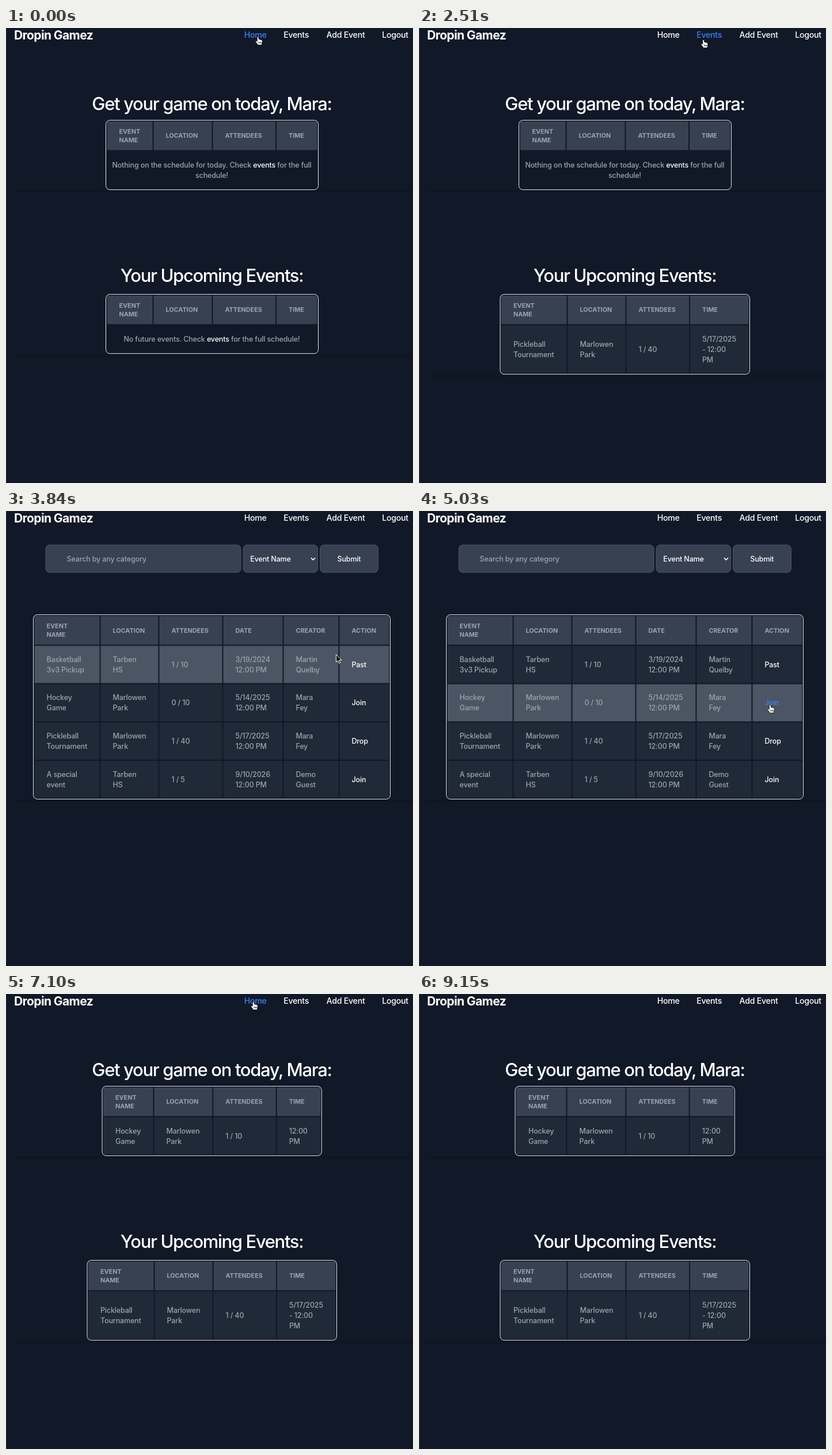
These frames come from a looping animation (707 by 792 pixels, 9770 ms). An HTML page:

```html
<!DOCTYPE html>
<html lang="en">
<head>
<meta charset="utf-8">
<title>Events app</title>
<style>
  html, body { margin: 0; width: 100%; height: 100%; overflow: hidden; background: #111827; }
  svg { display: block; width: 707px; height: 792px; }
  text {
    font: 450 12.5px Inter, Roboto, sans-serif; font-optical-sizing: none;
    letter-spacing: -.15px; fill: #9ca3af;
  }
  .brand { font-size: 21px; font-weight: 700; letter-spacing: -.6px; fill: #fff; }
  .nav { font-size: 14.2px; font-weight: 550; letter-spacing: -.28px; fill: #fff; }
  .title { font-size: 31px; font-weight: 500; letter-spacing: -1.35px; fill: #fff; }
  .head { font-size: 10.8px; font-weight: 700; letter-spacing: 0; }
  .strong { font-weight: 550; fill: #fff; }
  .mid { text-anchor: middle; }
  .field { fill: #374151; stroke: #4b5563; }
  .frame { fill: none; stroke: #e5e7eb; }
</style>
</head>
<body>
<svg id="stage" xmlns="http://www.w3.org/2000/svg"></svg>
<script>
const LOOP = 9770, STEP = 147.6;
const stage = document.getElementById('stage');

// Pointer tip: [step, x, y], linear between points
const PATH = [
  [0, 437.5, 15], [1, 437.5, 15], [2, 430, 40], [5, 330, 300], [9, 190, 379], [11, 149, 160],
  [14, 543, 150], [16, 510, 32], [17, 494, 20], [20, 494, 20], [21, 498.5, 23], [24, 560, 150],
  [28, 587, 350], [31, 599, 341], [32, 599, 341], [33, 606, 339], [34, 609.5, 337], [39, 609.5, 337],
  [40, 590, 290], [44, 440, 30], [45, 429.5, 13], [48, 429.5, 13], [51, 605, 90], [55, 155, 140],
  [56, 151, 240], [59, 500, 270], [60, 612, 430], [61, 600, 642]
];
const HIDE = 62;

const HAND = 'M-1.3 1.2Q0-.8 1.3 1.2L2 5Q3.3 4 4.2 5.4Q5.6 4.6 6.3 6Q8 5.8 7.9 8L6.8 14.5H.2' +
  'L-4 8.8Q-4.4 7-2.4 7.2L-1.2 8.4Z';
const ARROW = 'M0 0V13L3 10.2 5 15 7.2 14 5.2 9.4H9.4Z';

const NAV = [['Home', 413.7, 454], ['Events', 482.2, 528], ['Add Event', 556.6, 625], ['Logout', 653.2, 701]];
const HOME_HEAD = ['EVENT|NAME', 'LOCATION', 'ATTENDEES', 'TIME'];
const EVENT_HEAD = ['EVENT|NAME', 'LOCATION', 'ATTENDEES', 'DATE', 'CREATOR', 'ACTION'];
const EMPTY_COLS = [174.5, 255.5, 358.5, 469, 541.5];
const TODAY_COLS = [168, 256.5, 359.3, 469.7, 547.3];
const SOON_COLS = [142, 257.5, 359.5, 470, 573.5];
const EVENT_COLS = [48.5, 163.5, 265.5, 376.5, 481.4, 578.5, 666.5];
const LINK = '<tspan class="strong">events</tspan>';

let mouse = { x: 0, y: 0 }, onLink = false;

// y is the middle of the capitals
const text = (x, y, s, cls = '', attrs = '') =>
  `<text x="${x}" y="${y}" dy=".363em" class="${cls}" ${attrs}>${s}</text>`;
const rect = (x, y, w, h, attrs) => `<rect x="${x}" y="${y}" width="${w}" height="${h}" ${attrs}/>`;

function lines(x, y, s, gap, cls) {
  const parts = s.split('|');
  return parts.map((p, i) => text(x, y + (i - (parts.length - 1) / 2) * gap, p, cls)).join('');
}

// Turns blue while the pointer is on it
function link(x, x2, y, reach, s, cls) {
  const hot = mouse.x >= x && mouse.x <= x2 && Math.abs(mouse.y - y) < reach;
  onLink ||= hot;
  return text(x, y, s, cls, hot ? 'style="fill:#3b82f6"' : '');
}

// cols and ys hold the centres of the gaps between cells
function table(cols, ys, head, rows) {
  const left = cols[0], right = cols[cols.length - 1], bottom = ys[ys.length - 1];
  let out = rect(14, bottom + 2, 693, 4, 'fill="#0f1523"') +
    rect(left - 1, ys[0] - 1, right - left + 2, bottom - ys[0] + 2, 'rx="7" fill="#111827"');
  [head, ...rows].forEach((row, r) => {
    const y = ys[r], h = ys[r + 1] - y, cy = y + h / 2;
    const over = mouse.x > left && mouse.x < right && mouse.y > y && mouse.y < y + h;
    const fill = !r ? '#374151' : over ? '#4b5563' : '#1f2937';
    row.forEach((cell, c) => {
      const x = cols[c], tx = x + 22;
      out += rect(x + 1, y + 1, cols[c + 1] - x - 2, h - 2, `fill="${fill}"`);
      if (!r) out += lines(tx, cy, cell, 14.4, 'head');
      else if (c === 5) out += link(tx, tx + 27, cy, 9, cell, 'strong');
      else out += lines(tx, cy, cell, 18);
    });
  });
  return out + rect(left - 1, ys[0] - 1, right - left + 2, bottom - ys[0] + 2, 'rx="7" class="frame"');
}

function home(loaded, joined) {
  let out = text(357.5, 131.5, 'Get your game on today, Mara:', 'title mid') +
    text(357.5, 431, 'Your Upcoming Events:', 'title mid');
  const todayY = [161.5, 213.5, 280.5];
  if (loaded && joined) {
    out += table(TODAY_COLS, todayY, HOME_HEAD, [['Hockey|Game', 'Marlowen|Park', '1 / 10', '12:00|PM']]);
  } else {
    out += table(EMPTY_COLS, todayY, HOME_HEAD, [[]]) +
      lines(357.5, 247.5, `Nothing on the schedule for today. Check ${LINK} for the full|schedule!`, 18, 'mid');
  }
  if (loaded) {
    out += table(SOON_COLS, [464.5, 516.5, 601.7], HOME_HEAD,
      [['Pickleball|Tournament', 'Marlowen|Park', '1 / 40', '5/17/2025|- 12:00|PM']]);
  } else {
    out += table(EMPTY_COLS, [464.5, 516.5, 565.7], HOME_HEAD, [[]]) +
      text(357.5, 541.5, `No future events. Check ${LINK} for the full schedule!`, 'mid');
  }
  return out;
}

function events(loaded, joined) {
  const out = rect(69, 59, 339, 48, 'rx="7" class="field"') +
    rect(412, 59, 129.5, 48, 'rx="7" class="field"') +
    rect(545.5, 59, 101, 48, 'rx="7" class="field"') +
    text(105.5, 83, 'Search by any category') +
    text(424.3, 83.5, 'Event Name', 'strong') +
    text(596, 83, 'Submit', 'strong mid') +
    '<path d="M529.8 81.5l3.6 3.6 3.6-3.6" fill="none" stroke="#fff" stroke-width="1.7"/>';
  if (!loaded) return out;
  return out + table(EVENT_COLS, [181.5, 233.7, 300.5, 367.2, 433.9, 500.5], EVENT_HEAD, [
    ['Basketball|3v3 Pickup', 'Tarben|HS', '1 / 10', '3/19/2024|12:00 PM', 'Martin|Quelby', 'Past'],
    ['Hockey|Game', 'Marlowen|Park', joined ? '1 / 10' : '0 / 10', '5/14/2025|12:00 PM', 'Mara|Fey', joined ? 'Drop' : 'Join'],
    ['Pickleball|Tournament', 'Marlowen|Park', '1 / 40', '5/17/2025|12:00 PM', 'Mara|Fey', 'Drop'],
    ['A special|event', 'Tarben|HS', '1 / 5', '9/10/2026|12:00 PM', 'Demo|Guest', 'Join']
  ]);
}

function pointerAt(n) {
  if (n >= HIDE) return { x: -99, y: -99 };
  const i = Math.max(1, PATH.findIndex(p => p[0] >= n));
  const [a, ax, ay] = PATH[i - 1], [b, bx, by] = PATH[i], k = (n - a) / (b - a);
  return { x: ax + (bx - ax) * k, y: ay + (by - ay) * k };
}

function cursor() {
  const at = `transform="translate(${mouse.x} ${mouse.y})"`;
  return onLink
    ? `<g ${at} stroke="#111" stroke-width=".9"><path d="${HAND}" fill="#fff"/><path d="M1.6 9v3M3.6 9v3M5.5 9v3"/></g>`
    : `<path ${at} d="${ARROW}" stroke="#fff" stroke-width="1"/>`;
}

function draw(n) {
  mouse = pointerAt(n);
  onLink = false;
  const joined = n >= 37;
  const page = n >= 19 && n < 46
    ? events(n >= 21, joined)
    : home((n >= 2 && n < 19) || n >= 48, joined);
  stage.innerHTML = rect(0, 0, 1, 792, 'fill="#252d3c"') +
    text(14, 12.5, 'Dropin Gamez', 'brand') +
    NAV.map(([s, x, x2]) => link(x, x2, 12, 14, s, 'nav')).join('') +
    page + cursor();
}

let last = -1;
function tick() {
  const n = Math.floor((performance.now() % LOOP + 10) / STEP);
  if (n !== last) draw(last = n);
  requestAnimationFrame(tick);
}
tick();
</script>
</body>
</html>
```
